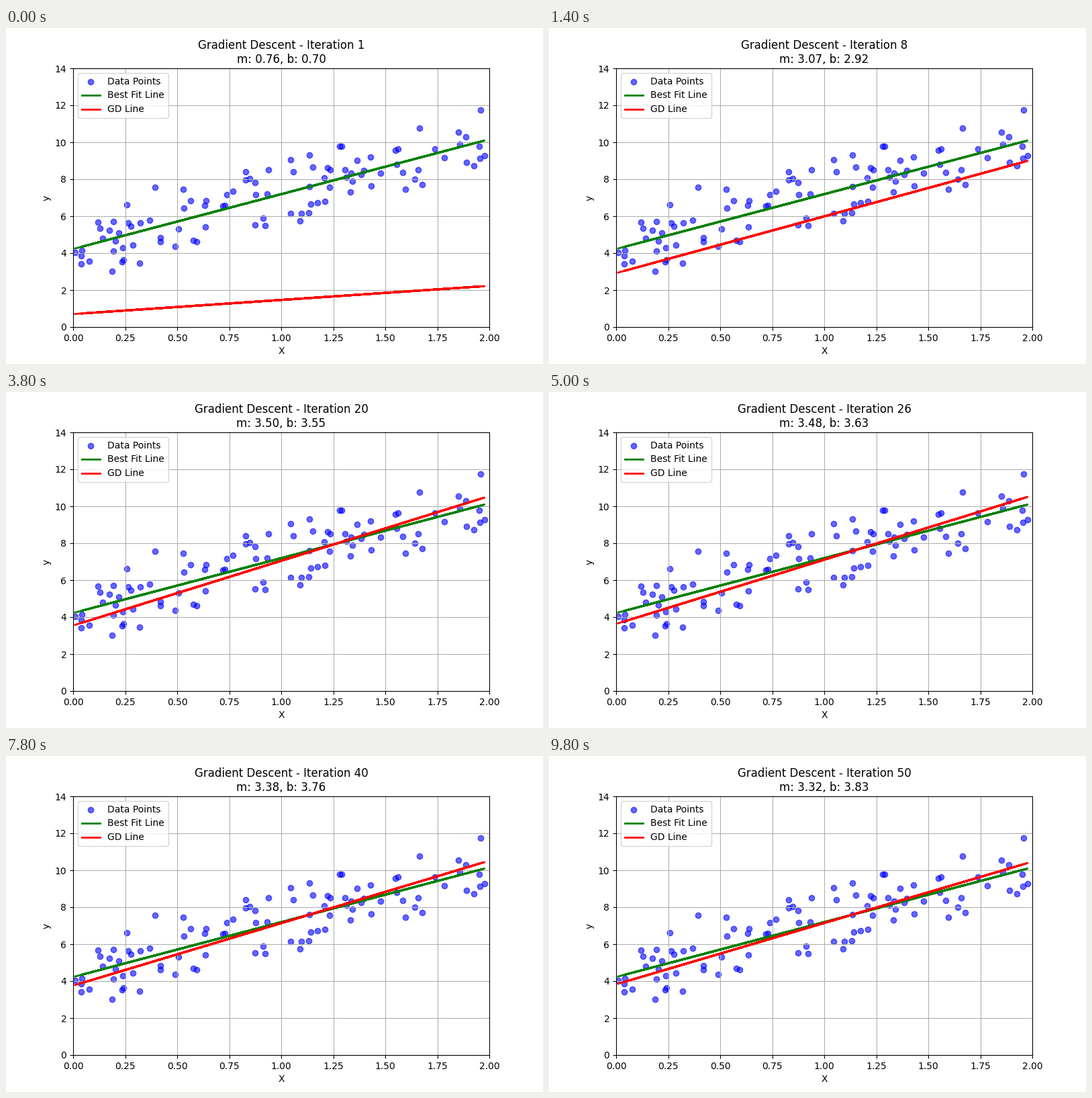
A matplotlib script for the animation above (10000 ms loop, 800 px wide and 500 px high).

```python
import numpy as np
import matplotlib.pyplot as plt
from matplotlib.animation import FuncAnimation

STEPS = 50
RATE = 0.05

# Noisy samples around y = 4 + 3x
np.random.seed(0)
X = 2 * np.random.rand(100, 1)
y = 4 + 3 * X + np.random.randn(100, 1)

# Closed-form least squares
A = np.c_[np.ones((len(X), 1)), X]
best = np.linalg.inv(A.T @ A) @ A.T @ y


def descend(steps, rate):
    """Return (m, b) after each gradient step, starting from zero."""
    m = b = 0.0
    path = []
    for _ in range(steps):
        err = m * X + b - y
        m, b = m - rate * 2 * np.mean(err * X), b - rate * 2 * np.mean(err)
        path.append((m, b))
    return path


path = descend(STEPS, RATE)

fig, ax = plt.subplots(figsize=(8, 5), dpi=100)
ax.scatter(X, y, color="blue", alpha=0.6, label="Data Points")
ax.plot(X, A @ best, color="green", linewidth=2, label="Best Fit Line")
gd_line, = ax.plot([], [], color="red", linewidth=2, label="GD Line")
ax.set_xlim(0, 2)
ax.set_ylim(0, 14)
ax.set_xlabel("X")
ax.set_ylabel("y")
ax.legend(loc="upper left")
ax.grid(True)


def update(i):
    m, b = path[i]
    gd_line.set_data(X.ravel(), (m * X + b).ravel())
    ax.set_title(f"Gradient Descent - Iteration {i + 1}\nm: {m:.2f}, b: {b:.2f}")
    return gd_line,


anim = FuncAnimation(fig, update, frames=STEPS, init_func=lambda: update(0),
                     interval=200, repeat=True, repeat_delay=0)
plt.show()
```
